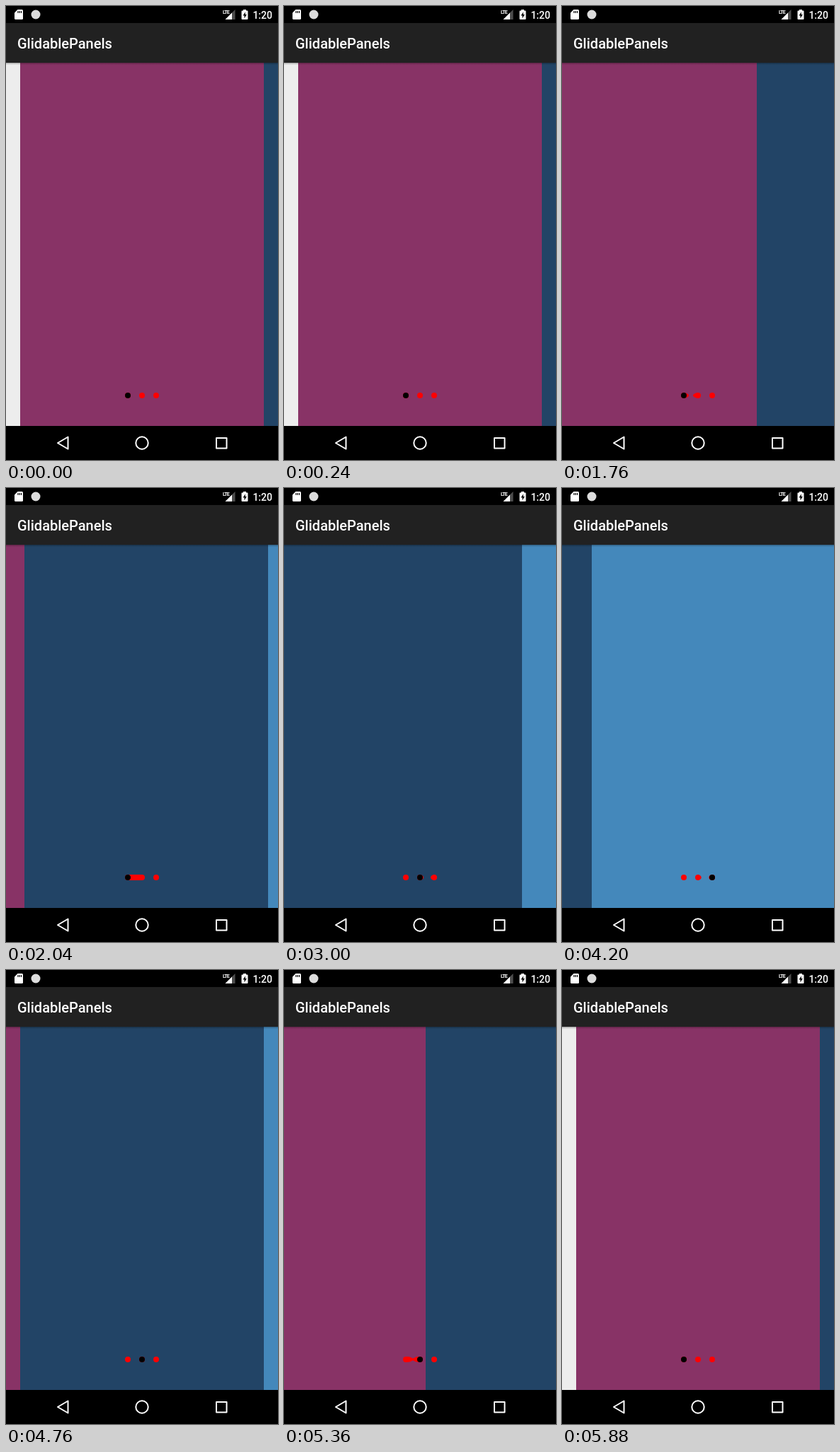
These frames come from a looping animation (384 by 640 pixels, 6080 ms). An HTML page:

```html
<!DOCTYPE html>
<html lang="en">
<head>
<meta charset="utf-8">
<title>Pager</title>
<style>
  html, body { margin: 0; width: 100%; height: 100%; overflow: hidden; background: #000; }
  svg { display: block; width: 100vw; height: 100vh; }
  text { font-family: Roboto, "Noto Sans", sans-serif; fill: #fff; }
  .title { font-size: 20px; font-weight: 500; }
  .clock { font-size: 14px; font-weight: 500; text-anchor: end; }
  .net { font-size: 7px; font-weight: 700; letter-spacing: -.8px; }
  .nav { fill: none; stroke: #fff; stroke-width: 2; stroke-linejoin: round; }
</style>
</head>
<body>
<svg viewBox="0 0 384 640">
  <defs>
    <linearGradient id="shade" x2="0" y2="1">
      <stop offset="0" stop-opacity=".3"/>
      <stop offset="1" stop-opacity="0"/>
    </linearGradient>
  </defs>

  <rect y="80" width="384" height="512" fill="#ededed"/>
  <g id="pages" shape-rendering="crispEdges">
    <rect x="20" y="80" width="344" height="512" fill="#836"/>
    <rect x="364" y="80" width="344" height="512" fill="#246"/>
    <rect x="708" y="80" width="344" height="512" fill="#48b"/>
  </g>
  <path id="ink" fill="#f00"/>
  <circle id="selected" cy="549" r="4"/>

  <!-- status and title bars -->
  <rect y="80" width="384" height="3" fill="url(#shade)"/>
  <rect width="384" height="24"/>
  <rect y="24" width="384" height="56" fill="#212121"/>
  <text class="title" x="16" y="60">GlidablePanels</text>
  <path fill="#fff" d="M16.500 5H22.500Q24 5 24 6.500V17.500Q24 19 22.500 19H13.500Q12 19 12 17.500V9.500Z"/>
  <path stroke="#000" stroke-width="1.200" d="M17 7v3M19.300 7v3M21.600 7v3"/>
  <circle cx="42" cy="12" r="6.500" fill="#ddd"/>
  <path fill="#4d4d4d" d="M323.500 5V19H309.500Z"/>
  <path fill="#fff" d="M319 9.500V19H309.500Z"/>
  <text class="net" x="306" y="11">LTE</text>
  <path fill="#fff" d="M335 5h4v1.500h1.500q1 0 1 1V18q0 1-1 1h-7q-1 0-1-1V7.500q0-1 1-1H335Z"/>
  <path d="M337.800 8.500V12h2l-3.300 5.500v-4h-2Z"/>
  <text class="clock" x="376" y="17.500">1:20</text>

  <!-- navigation bar -->
  <rect y="592" width="384" height="48"/>
  <g class="nav">
    <path d="M73 616L87.500 607.500V624.500Z"/>
    <circle cx="192" cy="616" r="8.700"/>
    <rect x="297" y="609" width="14.500" height="14.500"/>
  </g>
</svg>
<script>
const LOOP = 6080, STEP = 40, PAGE = 344;
const R = 4, CY = 549, TOP = CY - R, BOTTOM = CY + R, GAP = 12;
const dotX = i => 172 + 20 * i;

// Each swipe: finger drag from x0 to x1 px, released at "up", then a decelerating settle.
const swipes = [
  { start: 1760, up: 1980, from: 0, to: 1, x0: 89, x1: 310, settle: 200 },
  { start: 3000, up: 3225, from: 1, to: 2, x0: 28, x1: 336, settle: 160 },
  { start: 4200, up: 4330, from: 2, to: 1, x0: 22, x1: 204, settle: 300 },
  { start: 5240, up: 5460, from: 1, to: 0, x0: 25, x1: 310, settle: 200 }
];

// Indicator timing in ms after release
const MOVE = { at: 80, len: 240 }, RETREAT = { at: 195, len: 160 }, REVEAL = { at: 233, len: 160 };

const pages = document.getElementById('pages');
const ink = document.getElementById('ink');
const selected = document.getElementById('selected');

const clamp = v => Math.min(1, Math.max(0, v));
const mix = (a, b, k) => a + (b - a) * k;

// cubic-bezier(.4, 0, .2, 1)
function ease(x) {
  if (x <= 0 || x >= 1) return clamp(x);
  let lo = 0, hi = 1, s;
  for (let i = 0; i < 24; i++) {
    s = (lo + hi) / 2;
    const bx = 1.2 * s * (1 - s) ** 2 + .6 * s * s * (1 - s) + s ** 3;
    if (bx < x) lo = s; else hi = s;
  }
  return 3 * s * s * (1 - s) + s ** 3;
}
const phase = (s, p) => ease((s - p.at) / p.len);

function travel(w, t) {
  if (t < w.up) return mix(w.x0, w.x1, (t - w.start) / (w.up - w.start));
  const rest = 1 - clamp((t - w.up) / w.settle);
  return PAGE - (PAGE - w.x1) * rest ** 5;
}

// Capsule from x1 to x2; a plain dot when they are 2r apart
function pill(x1, x2, r = R) {
  const a = x1 + r, b = x2 - r;
  return `M${a} ${CY + r}A${r} ${r} 0 0 1 ${a} ${CY - r}H${b}A${r} ${r} 0 0 1 ${b} ${CY + r}Z`;
}
const dot = (x, r = R) => pill(x - r, x + r, r);

// Dot stretched to one side: dir 1 is right, -1 is left
function bulge(x, dir, k) {
  const end = x + dir * (R + k * GAP), c = x + dir * R / 2;
  return `M${x} ${BOTTOM}A${R} ${R} 0 0 ${dir > 0 ? 1 : 0} ${x} ${TOP}` +
    `C${c} ${TOP} ${end} ${CY - R / 2} ${end} ${CY}` +
    `C${end} ${CY + R / 2} ${c} ${BOTTOM} ${x} ${BOTTOM}Z`;
}

// Two neighbouring dots flowing into one another
function join(a, b, k) {
  if (k <= 0) return dot(a) + dot(b);
  if (k <= .5) return bulge(a, 1, k) + bulge(b, -1, k);
  if (k >= .998) return pill(a - R, b + R);
  const f = (k - .2) * 1.25, m = (a + b) / 2, near = f * R, far = (1 - f) * R;
  const hi = CY - near, lo = CY + near;
  return `M${a} ${BOTTOM}A${R} ${R} 0 0 1 ${a} ${TOP}` +
    `C${m - near} ${TOP} ${m - far} ${hi} ${m} ${hi}` +
    `C${m + far} ${hi} ${m + near} ${TOP} ${b} ${TOP}` +
    `A${R} ${R} 0 0 1 ${b} ${BOTTOM}` +
    `C${m + near} ${BOTTOM} ${m + far} ${lo} ${m} ${lo}` +
    `C${m - far} ${lo} ${m - near} ${BOTTOM} ${a} ${BOTTOM}Z`;
}

function inkPath(w, t, moved) {
  const left = Math.min(w.from, w.to), a = dotX(left), b = dotX(left + 1);
  const other = dot(dotX(left ? 0 : 2));
  const s = t - w.up;
  if (s < RETREAT.at) return other + join(a, b, moved / PAGE);
  const back = phase(s, RETREAT), grow = phase(s, REVEAL);
  const body = w.to > w.from
    ? pill(mix(a, b, back) - R, b + R)
    : pill(a - R, mix(b, a, back) + R);
  return other + body + (grow > 0 ? dot(dotX(w.from), R * grow) : '');
}

function draw(t) {
  const w = swipes.filter(v => v.start <= t).pop();
  let scroll = 0, path = [0, 1, 2].map(i => dot(dotX(i))).join(''), x = dotX(0);
  if (w) {
    const moved = travel(w, t);
    scroll = w.from * PAGE + (w.to - w.from) * moved;
    path = inkPath(w, t, moved);
    x = mix(dotX(w.from), dotX(w.to), phase(t - w.up, MOVE));
  }
  pages.setAttribute('transform', `translate(${-Math.round(scroll)} 0)`);
  ink.setAttribute('d', path);
  selected.setAttribute('cx', x);
}

const began = performance.now();
function tick() {
  const t = (performance.now() - began) % LOOP;
  draw(Math.floor(t / STEP) * STEP);
  requestAnimationFrame(tick);
}
tick();
</script>
</body>
</html>
```
